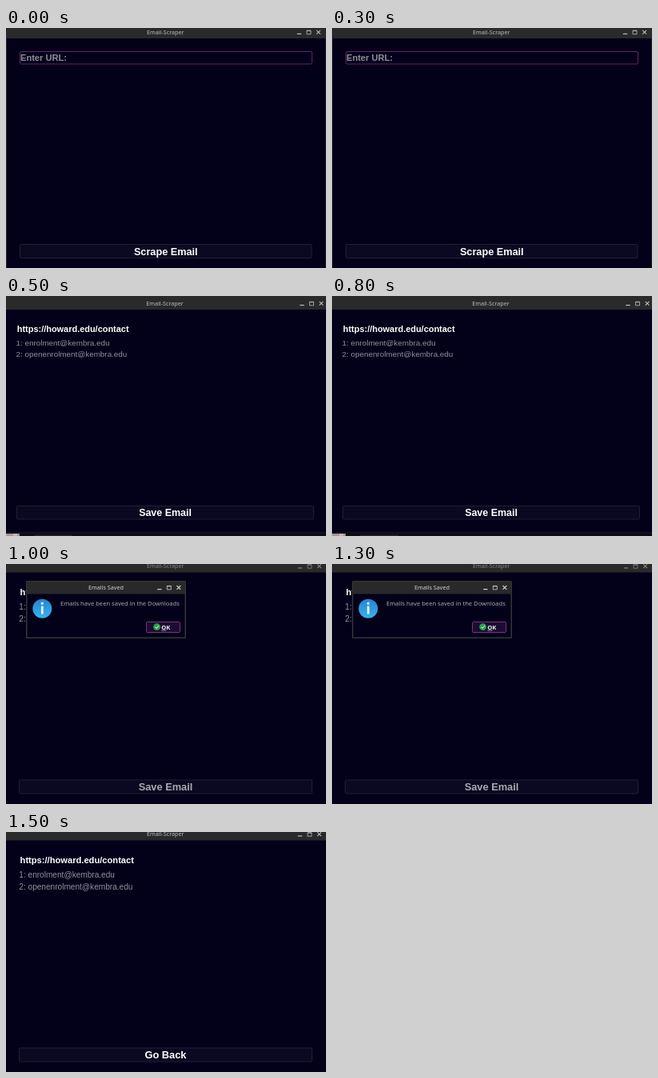
Write an HTML page that moves like this. It is 400 px wide and 300 px high and loops after 2 s.

```html
<!DOCTYPE html>
<html lang="en">
<head>
<meta charset="utf-8">
<title>Email-Scraper</title>
<style>
html, body { margin: 0; width: 100%; height: 100%; overflow: hidden; background: #030019; }
svg { display: block; width: 100vw; height: 100vh; }
text { white-space: pre; }
.ui { font-family: "Noto Sans", sans-serif; }
.app { font-family: "Liberation Sans", Arial, sans-serif; }
.bold { font-weight: 700; }
</style>
</head>
<body>
<svg id="stage" viewBox="0 0 400 300"></svg>
<script>
const stage = document.getElementById('stage');
const STEP = 500;
const URL_TEXT = 'https://howard.edu/contact';
const EMAILS = ['enrolment@kembra.edu', 'openenrolment@kembra.edu'];

const rect = (x, y, w, h, fill, extra = '') =>
  `<rect x="${x}" y="${y}" width="${w}" height="${h}" fill="${fill}" ${extra}/>`;

const label = (s, x, y, size, fill, cls, anchor = 'start') =>
  `<text x="${x}" y="${y}" font-size="${size}" fill="${fill}" class="${cls}" text-anchor="${anchor}">${s}</text>`;

const stroke = (d, color, width = 1) =>
  `<path d="${d}" fill="none" stroke="${color}" stroke-width="${width}"/>`;

// Minimise, maximise and close, centred on height y
const controls = (x, y, color) =>
  stroke(`M${x - 2.7} ${y + 2.2}h5.4`, color, 1.2) +
  stroke(`M${x + 9.5} ${y - 2}h5v4.5h-5zM${x + 9.5} ${y - 1.6}h5`, color, 0.8) +
  stroke(`M${x + 21.7} ${y - 2.4}l4.8 4.8m0 -4.8l-4.8 4.8`, color, 1.1);

const titleBar = (h, base, x, y, color, left = 199.3) =>
  rect(0, 0, 400, h, '#2a2a2b') +
  label('Email-Scraper', left, base, 7.2, color, 'ui', 'middle') +
  controls(x, y, color);

const button = (s, x, y, w, h, base, size, color = '#fff') =>
  rect(x, y, w, h, '#0b0821', 'stroke="#211e36" stroke-width="1" rx="1"') +
  label(s, x + w / 2, base, size, color, 'app bold', 'middle');

const results = (x, head, first, gap, headSize, size) =>
  label(URL_TEXT, x + 0.8, head, headSize, '#fff', 'app bold') +
  EMAILS.map((e, i) =>
    label(`${i + 1}: ${e}`, x - 0.5, first + i * gap, size, '#918f9b', 'app')).join('');

const background = rect(0, 0, 400, 300, '#030019');

const form = () => background +
  rect(0, 0, 1, 300, '#29292d') + rect(399, 0, 1, 300, '#1c1b26') +
  titleBar(13, 8, 366.5, 5.2, '#bcbcbc') +
  rect(17.5, 29.5, 365, 15.5, '#04001c', 'stroke="#672466" rx="1.5"') +
  label('Enter URL:', 18, 41, 11.1, '#908e98', 'app bold') +
  button('Scrape Email', 17.5, 270.5, 364.5, 17, 283.7, 12.7);

const found = () => background +
  titleBar(17, 11.8, 370, 9.3, '#bcbcbc', 198.5) +
  results(13, 45, 62, 14.4, 10.95, 9.87) +
  button('Save Email', 13.5, 262.5, 371, 16.5, 275.2, 12.45) +
  rect(0, 295.5, 400, 1, '#28272e') +
  rect(0, 296.5, 400, 3.5, '#0d0c14') +
  rect(0, 297, 17, 3, '#a99499') +
  rect(9, 297, 5, 3, '#c8b4b8') +
  rect(35, 298.5, 48, 1.5, '#24202a');

const listWindow = (caption, dim) => background +
  titleBar(10.5, 5.4, 367.5, 2.8, dim ? '#858585' : '#bcbcbc') +
  results(16.8, 39, 56.5, 15, 11.15, 10.1) +
  button(caption, 16.5, 270, 366, 17, 283.2, 12.82, dim ? '#aaa9b2' : '#fff');

const dialog = () =>
  rect(25, 21, 200, 72, '#353538', 'rx="1.5"') +
  rect(26.5, 37, 197, 54.5, '#030019') +
  rect(26, 22, 198, 15.5, '#29292a') +
  label('Emails Saved', 125, 31.8, 7.2, '#d0d0d0', 'ui', 'middle') +
  controls(191.8, 29.4, '#d0d0d0') +
  '<circle cx="45.3" cy="55.7" r="12" fill="url(#blue)"/>' +
  '<circle cx="45.3" cy="49.3" r="1.7" fill="#e2f2fc"/>' +
  rect(43.9, 52.6, 2.8, 10, '#e2f2fc') +
  label('Emails have been saved in the Downloads', 68, 51.6, 7.6, '#aaa8b4', 'ui') +
  rect(175.5, 72.5, 42, 13, '#1c0c33', 'stroke="#7b347f" rx="1"') +
  '<circle cx="188.6" cy="78.6" r="4.4" fill="#25a244"/>' +
  stroke('M186.5 78.7l1.6 1.6 2.8 -3.1', '#fff', 1) +
  label('OK', 194.3, 81.6, 7.6, '#eee', 'ui bold') +
  stroke('M194.5 83.1h5.8', '#ddd', 0.7);

const scenes = [
  form,
  found,
  () => listWindow('Save Email', true) + dialog(),
  () => listWindow('Go Back', false)
];

const defs = '<defs><linearGradient id="blue" x2="0" y2="1">' +
  '<stop stop-color="#2383d2"/><stop offset="1" stop-color="#38b3ef"/></linearGradient></defs>';

let shown = -1;
function draw(t) {
  const i = Math.floor(t / STEP) % scenes.length;
  if (i === shown) return;
  shown = i;
  stage.innerHTML = defs + scenes[i]();
}

const start = performance.now();
function tick() {
  draw(performance.now() - start);
  requestAnimationFrame(tick);
}
tick();
</script>
</body>
</html>
```
